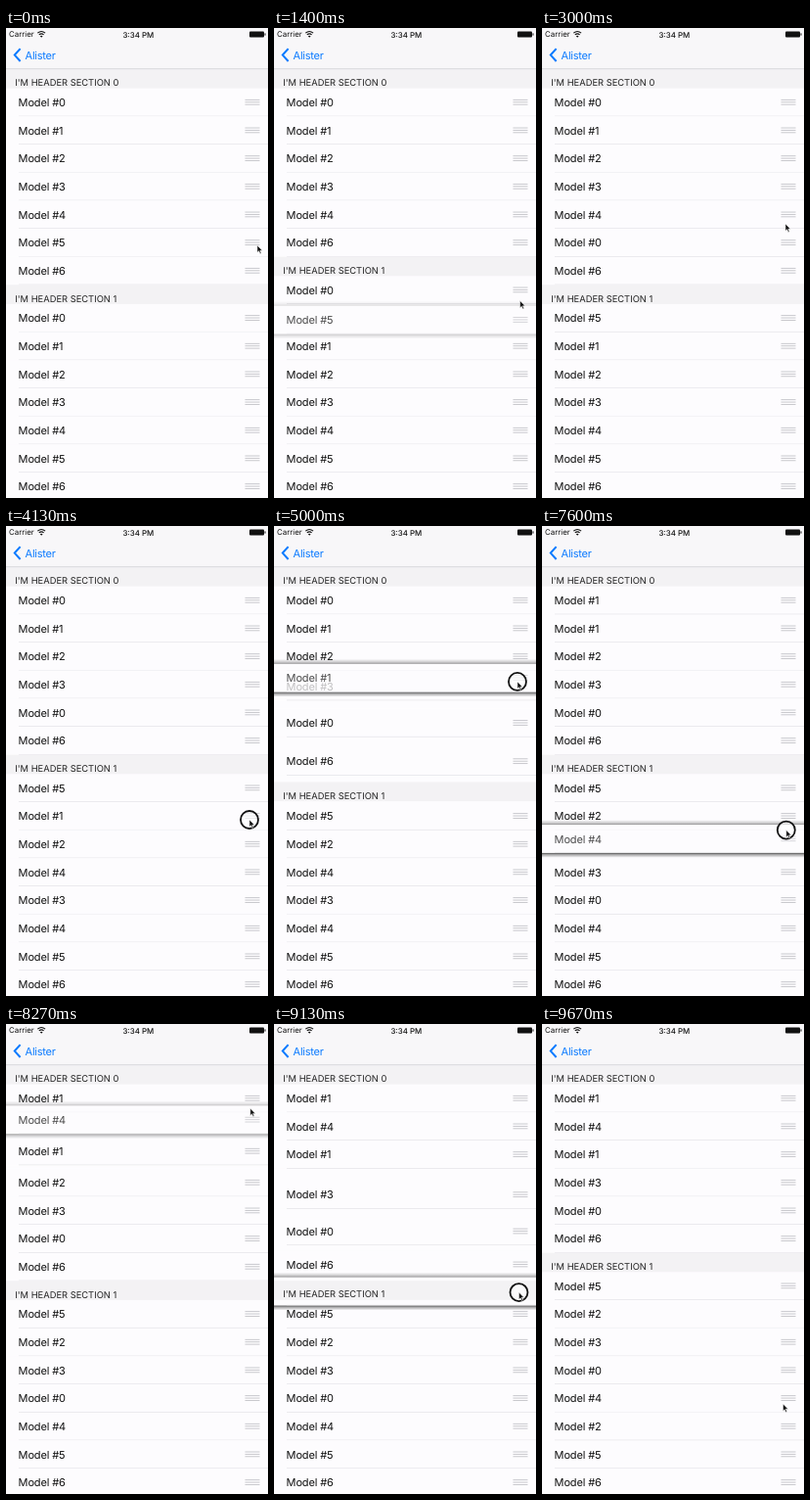
These frames come from a looping animation (268 by 480 pixels, 9790 ms). An HTML page:

```html
<!DOCTYPE html>
<html lang="en">
<head>
<meta charset="utf-8">
<title>Reordering rows</title>
<style>
  html, body { margin: 0; width: 100%; height: 100%; overflow: hidden; background: #fdfcfe; }
  svg { display: block; width: 268px; height: 480px; font-family: Inter, Roboto, sans-serif; }
  text { text-rendering: geometricPrecision; }
  .model { font-size: 11px; letter-spacing: -.15px; fill: #111; }
  .head { font-size: 9.35px; fill: #222; }
  .back { font-size: 11px; letter-spacing: -.25px; fill: #0a7aff; }
  .status { font-size: 7.9px; fill: #111; }
</style>
</head>
<body>
<svg id="stage" viewBox="0 0 268 480">
  <defs>
    <linearGradient id="up" x1="0" y1="1" x2="0" y2="0">
      <stop offset="0" stop-opacity=".45"/><stop offset=".35" stop-opacity=".2"/><stop offset="1" stop-opacity="0"/>
    </linearGradient>
    <linearGradient id="down" x1="0" y1="0" x2="0" y2="1">
      <stop offset="0" stop-opacity=".7"/><stop offset=".35" stop-opacity=".34"/><stop offset="1" stop-opacity="0"/>
    </linearGradient>
  </defs>
  <rect width="268" height="480" fill="#fdfcfe"/>
  <g id="rows"></g>
  <g id="shadow">
    <rect y="-5" width="268" height="5" fill="url(#up)"/>
    <rect y="28.67" width="268" height="5" fill="url(#down)"/>
  </g>
  <g id="lifted"></g>
  <g id="heads"></g>
  <g id="bar">
    <rect width="268" height="42" fill="#f8f7f9"/>
    <rect y="41.5" width="268" height=".6" fill="#c6c6c9"/>
    <text class="status" x="3" y="9.4">Carrier</text>
    <g fill="none" stroke="#111" stroke-width="1.1">
      <path d="M32.3 5.2Q36.2 1.7 40.1 5.2M33.8 6.9Q36.2 4.8 38.6 6.9"/>
    </g>
    <path d="M36.2 9.8L34.8 8.2Q36.2 7.1 37.6 8.2Z" fill="#111"/>
    <text class="status" x="135.3" y="9.5" text-anchor="middle" font-weight="500">3:34 PM</text>
    <rect x="249" y="3.4" width="15" height="6.2" rx="1" fill="#111"/>
    <rect x="264.5" y="5.4" width="1" height="2.2" fill="#111"/>
    <path d="M14.6 21.2L8.8 27.6L14.6 34" fill="none" stroke="#0a7aff" stroke-width="2"/>
    <text class="back" x="19.6" y="31.6">Alister</text>
  </g>
  <g id="cursor">
    <circle id="ring" r="9" fill="#fff" fill-opacity=".6" stroke="#111" stroke-width="1.8"/>
    <path d="M0 0V7.2L1.7 5.7L2.9 8.4L4.1 7.9L2.9 5.2H5.2Z" fill="#111" stroke="#fff" stroke-width=".5"/>
  </g>
</svg>
<script>
const LOOP = 9790, TOP = 61.6, ROW = 28.67, HEAD = 19.6;
const SETTLE = 270, SHIFT = 270;
const $ = id => document.getElementById(id);
const clamp = p => Math.max(0, Math.min(1, p));
const mix = (a, b, p) => a + (b - a) * p;
const smooth = p => (p = clamp(p), p * p * (3 - 2 * p));
const cubic = p => (p = clamp(p), p < .5 ? 4 * p ** 3 : 1 - 4 * (1 - p) ** 3);
const easeOut = p => 1 - (1 - clamp(p)) ** 2;

// from/to: places in the list, the second header included
// arrive: pointer reaches (x, y); endY: row centre when let go
const moves = [
  { from: 5, to: 8,  arrive: 130,  press: 130,  x: 253,   y: 221, lift: 400,  drag: 880,  drop: 1250, endY: 306 },
  { from: 7, to: 5,  arrive: 1515, press: 1670, x: 251,   y: 265, lift: 1930, drag: 1960, drop: 2400, endY: 222 },
  { from: 4, to: 10, arrive: 2730, press: 3030, x: 249,   y: 200, lift: 3270, drag: 3300, drop: 3800, endY: 350 },
  { from: 8, to: 1,  arrive: 4070, press: 4100, x: 249,   y: 300, lift: 4400, drag: 4550, drop: 5220, endY: 108 },
  { from: 0, to: 11, arrive: 5530, press: 5630, x: 248.3, y: 82.7, lift: 5930, drag: 6140, drop: 6590, endY: 377 },
  { from: 9, to: 1,  arrive: 7040, press: 7070, x: 249.8, y: 316, lift: 7330, drag: 7543, drop: 8185, endY: 90 },
  { from: 3, to: 12, arrive: 8530, press: 8600, x: 250.5, y: 163, lift: 8870, drag: 8900, drop: 9390, endY: 405 }
];

const place = (el, x, y) => el.setAttribute("transform", `translate(${x} ${y})`);

function group(parent, html) {
  const g = document.createElementNS("http://www.w3.org/2000/svg", "g");
  g.innerHTML = html;
  parent.append(g);
  return g;
}

function makeRow(n) {
  const grip = [11.7, 14.1, 16.5].map(y =>
    `<rect x="244.5" y="${y - .4}" width="15" height=".9" fill="#c3c3c8"/>`).join("");
  const el = group($("rows"), `<rect width="268" height="${ROW}" fill="#fdfcfe"/>
    <text class="model" x="12.6" y="18.4">Model #${n}</text>${grip}
    <rect x="13" y="${ROW - .6}" width="255" height=".6" fill="#e0e0e4"/>`);
  return { el, h: ROW };
}

function makeHead(n) {
  const el = group($("heads"), `<rect width="268" height="${HEAD}" fill="#f3f2f4"/>
    <text class="head" x="9.3" y="17.3">I'M HEADER SECTION ${n}</text>`);
  return { el, h: HEAD };
}

function layout(order) {
  let y = TOP;
  return new Map(order.map(item => {
    const top = y;
    y += item.h;
    return [item, top];
  }));
}

const section = () => Array.from({ length: 7 }, (_, n) => makeRow(n));
place(makeHead(0).el, 0, 42);
const items = [...section(), makeHead(1), ...section()];

const dragTop = (m, t) =>
  mix(m.startTop, m.endY - ROW / 2, smooth((t - m.drag) / (m.drop - m.drag)));

// When the dragged row's centre comes close to an item, that item gives way.
function hitTime(m, item) {
  const dir = Math.sign(m.to - m.from);
  const edge = m.before.get(item) + item.h / 2 - dir * 10;
  let t = m.drag;
  while (t < m.drop && (dragTop(m, t) + ROW / 2 - edge) * dir < 0) t += 4;
  return t;
}

let order = items;
for (const m of moves) {
  m.before = layout(order);
  m.row = order[m.from];
  m.startTop = m.before.get(m.row);
  order = order.filter(item => item !== m.row);
  order.splice(m.to, 0, m.row);
  m.after = layout(order);
  m.hits = new Map(items.map(item => [item, hitTime(m, item)]));
  m.endCursor = m.y + m.endY - ROW / 2 - m.startTop;
}

function drawRows(t) {
  const m = moves.findLast(move => move.lift <= t) || moves[0];
  const held = t >= m.lift && t < m.drop + SETTLE;
  for (const item of items) {
    const a = m.before.get(item), b = m.after.get(item);
    let y = mix(a, b, smooth((t - m.hits.get(item)) / SHIFT));
    if (item === m.row) {
      const settle = easeOut((t - m.drop) / SETTLE);
      y = mix(dragTop(m, t), b, settle);
      place($("shadow"), 0, y);
      $("shadow").setAttribute("opacity", held ? 1 - settle * .85 : 0);
    }
    const up = held && item === m.row;
    if (item.h === ROW) {
      const layer = up ? $("lifted") : $("rows");
      if (item.el.parentNode !== layer) layer.append(item.el);
      item.el.setAttribute("opacity", up ? .75 : 1);
    }
    place(item.el, 0, y);
  }
}

function drawCursor(t) {
  const i = moves.findLastIndex(move => move.press <= t);
  const m = moves[i];
  const down = !!m && t < m.drop;
  let x, y;
  if (down) {
    x = m.x;
    y = m.y + dragTop(m, t) - m.startTop;
  } else {
    const a = m ? { x: m.x, y: m.endCursor, t: m.drop } : { x: 257, y: 222, t: 40 };
    const b = moves[i + 1] || { x: 246.5, y: 388, arrive: 9660 };
    const p = cubic((t - a.t) / (b.arrive - a.t));
    x = mix(a.x, b.x, p);
    y = mix(a.y, b.y, p);
  }
  place($("cursor"), x, y);
  $("ring").setAttribute("opacity", down ? 1 : 0);
}

function frame() {
  const t = performance.now() % LOOP;
  drawRows(t);
  drawCursor(t);
  requestAnimationFrame(frame);
}
frame();
</script>
</body>
</html>
```
